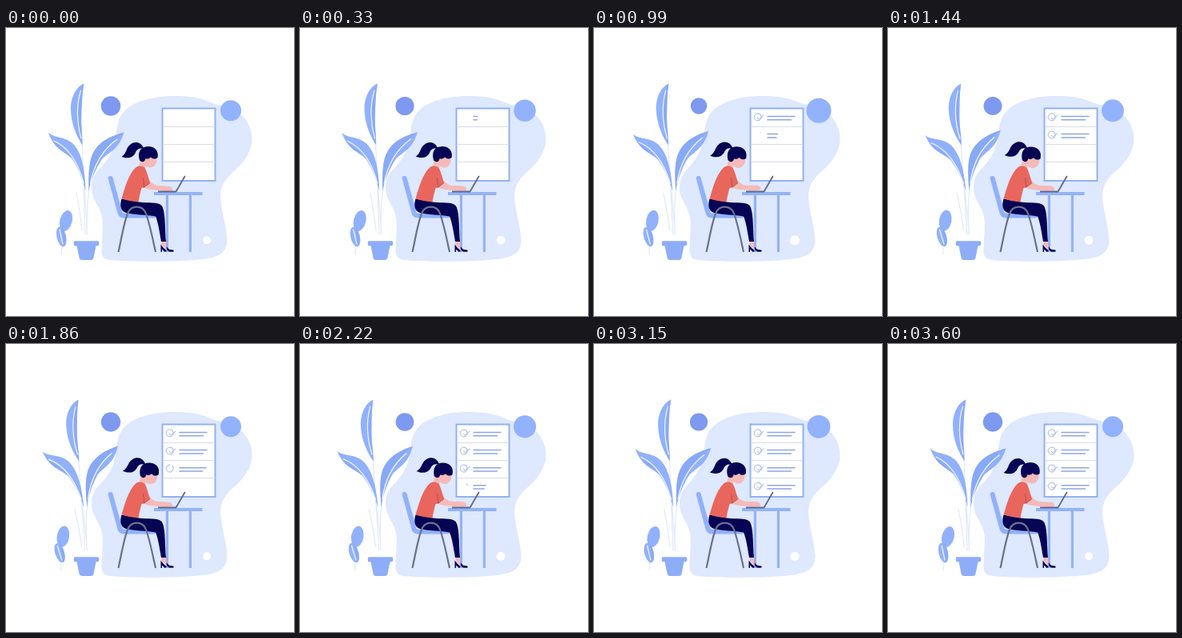
Animation of 360 by 360 pixels, one loop 3.63 s. Source, as an HTML page:

```html
<!DOCTYPE html>
<html lang="en">
<head>
<meta charset="utf-8">
<title>Checklist at the desk</title>
<style>
html, body { margin: 0; width: 100%; height: 100%; overflow: hidden; background: #fff; }
svg { display: block; width: 100vw; height: 100vh; }
.leaf { fill: #91b1fc; }
.shade { fill: #7c9eec; }
.vein { fill: none; stroke: #f4f7ff; stroke-width: 1.2; stroke-linecap: round; }
.stem { fill: none; stroke: #e1e9fb; stroke-width: 1.2; stroke-linecap: round; }
.navy { fill: #060453; }
.skin { fill: #f5bab8; }
.desk { fill: #93b3f5; }
.row path { fill: none; stroke: #8fa6e6; stroke-width: 1.5; stroke-linecap: round; }
.row .thin { stroke: #9db0e8; stroke-width: 1; }
</style>
</head>
<body>
<svg viewBox="0 0 360 360">
  <path fill="#dee8fe" d="M210 85C185 85 162 91 150 102C139 112 139 124 137.500 136C135 154 127 166 116 177C107 186 105 199 109 211C113 221 119 227 120.500 239C121.500 251 119.500 266 119.500 279C119.500 287 124 290 135 290.500C165 292.500 220 292.500 250 288.500C267 286 276 280 276.500 266C276 250 269 228 268 211C268 196 275 187 287 177C299 166 308 152 307.500 138C307 122 298 108 283 101C272 96 264 97 253 92C240 86 226 85 210 85Z"/>
  <circle id="dotA" cx="131" cy="97.500" fill="#7d99f0"/>
  <circle id="dotB" cx="251" cy="265.300" fill="#fff"/>

  <rect x="195.500" y="100.500" width="66" height="90.500" fill="#fff" stroke="#92b1f3" stroke-width="2"/>
  <path d="M197 123.500H260.500M197 145.500H260.500M197 167.500H260.500" stroke="#d9dde6"/>
  <g id="rows"></g>
  <circle id="dotC" cx="281" cy="103.300" fill="#93b2fd"/>

  <g id="sprig">
    <path class="stem" d="M76 230C74 250 70 265 69 283"/>
    <ellipse class="leaf" cx="75" cy="241" rx="7.700" ry="13.200" transform="rotate(14 75 241)"/>
    <ellipse class="leaf" cx="69.200" cy="261" rx="5.800" ry="12.500" transform="rotate(-13 69.200 261)"/>
    <path class="shade" d="M70 250C75 253 77 266 72 273C72 265 71 257 70 250Z" opacity=".35"/>
    <path class="vein" d="M67 252L71 270"/>
  </g>

  <g id="plant">
    <path class="stem" d="M95 146C96 175 98 220 99 258M98 201C99 220 101 240 101.500 258M104 202C101 220 101 245 101.500 258M88 206C92 225 94 242 95 253"/>
    <g id="leafL">
      <path class="leaf" d="M53 130.500C60 138 73 135 83 144C93 153 99 172 99.500 204C96 191 92 177 84 165C75 154 60 153 53 130.500Z"/>
      <path class="shade" d="M60 143C76 152 91 170 99.500 204C96 191 92 177 84 165C76 156 65 153 60 143Z" opacity=".4"/>
      <path class="vein" d="M60 141C77 149 90 167 97 194"/>
    </g>
    <g id="leafR">
      <path class="leaf" d="M147.500 130.500C134 134 119 140 111 152.500C103 164 103 184 103.500 204C106 191 111 178 120 164C130 154 141 152 147.500 130.500Z"/>
      <path class="shade" d="M147.500 130.500C134 134 119 140 111 152.500C103 164 103 184 103.500 204C107 178 116 154 147.500 130.500Z" opacity=".4"/>
      <path class="vein" d="M139 139C121 152 110 170 105.500 194"/>
    </g>
    <path class="leaf" d="M97.500 69.500C88 73 81 86 81 101C81 119 88 135 95.500 146.500C96 135 93.500 122 94.300 107C95 94 95 83 97.500 69.500Z"/>
    <path class="shade" d="M97.500 69.500C90 82 88 95 88.500 110C90 125 92 136 95.500 146.500C96 135 93.500 122 94.300 107C95 94 95 83 97.500 69.500Z" opacity=".35"/>
    <path class="vein" d="M93.500 78C88 96 88.500 118 94 138"/>
  </g>
  <path fill="#8eadf8" d="M86 266.300H115Q116.300 266.300 116.300 269.200T115 272.200H112.500L109.500 287Q109 290 106 290H95Q92 290 91.500 287L88.500 272.200H86Q84.700 272.200 84.700 269.200T86 266.300Z"/>

  <path d="M130.700 188L142.500 231Q143.500 234.500 147 234.500H184.500" fill="none" stroke="#91b1fa" stroke-width="6" stroke-linecap="round" stroke-linejoin="round"/>
  <path class="desk" d="M185 205H245.500V209H232V280H228.800V209H203V280H199.800V209H185Z"/>

  <path class="skin" d="M194.500 265H199.500L199.800 272L203 276L200 276.500L194.500 271Z"/>
  <path class="navy" d="M193.500 270.500L196.500 274.500L200.500 278Q201 280 198 279.800L195.300 276.500L194.800 280H193.500ZM200.500 273L204 276.800L209 277.500Q211 279.500 208 279.800H204L201 277Z"/>
  <path class="navy" d="M144.500 213.500L166 217.500C178 219.500 189 216.500 194.500 222C199.500 228 198.500 250 200 267H194C192 256 190.500 244 187 235.500C175 233.500 160 233.500 150 231C142 228 142.500 220 144.500 213.500Z"/>
  <g id="head">
    <path class="skin" d="M168 162L175 170L173.500 177L166 175Z"/>
    <path class="skin" d="M171 159C176 155 187 157 188.500 163C189 170 185 174.500 180 174.500C174 174 170 168 171 159Z"/>
    <path class="navy" d="M167 165.500C164 155 168 148.300 177.500 148C186.500 148 191 154 189.500 162C186 164.500 183 163.500 181 161.500C178 164 176 164 174.500 163C174 166 172 168 169.500 167Z"/>
    <path class="navy" d="M172.500 151C168 139.500 155.500 141 151 151.500C149.500 156 147.500 159 144.500 161C152 163.500 158.500 162.500 161.500 156.500C163.500 151 167 149.500 172.500 151Z"/>
  </g>
  <g id="arm">
    <path class="skin" d="M171 199L179 190Q183 195.500 189 197L204 197.700Q209 199 208 203.300L200 204L181 202Q174 201 171 199Z"/>
  </g>
  <path fill="#e9665d" d="M162 174.500C166 171.500 171 172 174 175.500C176.500 181 178 187 180 193.500L172.500 199.500L169.500 200C168 206 166.500 211 165.500 217.500Q154 216.500 144.500 213.500C148.500 200 152.500 184 162 174.500Z"/>
  <path d="M171.500 187L172.800 199L180 193.500" fill="none" stroke="#9e4e5f" stroke-width=".8"/>
  <path d="M140.500 280C144.500 262 147.500 243 152 232C156 220.700 171 220.700 175 232C179.500 244 183 262 187 280" fill="none" stroke="#69728e" stroke-width="2.200"/>
  <path d="M190 204.500H212.500L223.800 185" fill="none" stroke="#61698c" stroke-width="1.800" stroke-linejoin="round"/>
</svg>
<script>
const LOOP = 3630, STEP = 605;
const $ = id => document.getElementById(id);
const clamp = v => Math.max(0, Math.min(1, v));
const part = (t, a, b) => clamp((t - a) / (b - a));
const outQuad = p => p * (2 - p);

// Ring, tick and two text bars of one checklist row
const shapes = [
  ["M1.5 -4.2A4.5 4.5 0 1 1 1.4 -4.3", "thin"],
  ["M-2.2 -.2L-.3 1.6L5.4 -3.2", "thin"],
  ["M10.5 -1.9H44.5", ""],
  ["M10.5 2.4H40", ""]
];

function make(tag, parent, attrs) {
  const el = document.createElementNS("http://www.w3.org/2000/svg", tag);
  for (const k in attrs) el.setAttribute(k, attrs[k]);
  return parent.appendChild(el);
}

const rows = [0, 1, 2, 3].map(i => {
  const g = make("g", $("rows"), { class: "row", transform: `translate(206.5 ${112.4 + 22.1 * i})` });
  return shapes.map(([d, cls]) => make("path", g, { d, class: cls, pathLength: 1 }));
});

function reveal(el, p) {
  el.style.visibility = p > 0 ? "visible" : "hidden";
  el.style.strokeDasharray = p < 1 ? `${p} 2` : "none";
}

function turn(id, angle, x, y) {
  $(id).setAttribute("transform", `rotate(${angle} ${x} ${y})`);
}

function draw(t) {
  const sway = (1 - Math.cos(2 * Math.PI * t / LOOP)) / 2;
  const pulse = (1 - Math.cos(4 * Math.PI * t / LOOP)) / 2;

  turn("plant", -2 * sway, 100, 266);
  turn("leafL", -2.2 * sway, 99, 203);
  turn("leafR", -2.2 * sway, 104, 203);
  turn("sprig", -4.8 * sway, 69, 285);
  turn("head", 5 * sway, 172, 175);
  turn("arm", -1.8 * pulse, 175, 196);

  $("dotA").setAttribute("r", 12.2 - 2 * pulse);
  $("dotB").setAttribute("r", 5 + 1.2 * pulse);
  $("dotC").setAttribute("r", 13 + 2.6 * pulse);

  rows.forEach(([ring, tick, long, short], i) => {
    const s = t - i * STEP;
    reveal(ring, part(s, 380, 690));
    reveal(tick, part(s, 690, 830));
    reveal(long, outQuad(part(s, 300, 720)));
    reveal(short, outQuad(part(s, 300, 720)));
  });
}

function frame() {
  draw(performance.now() % LOOP);
  requestAnimationFrame(frame);
}
frame();
</script>
</body>
</html>
```
